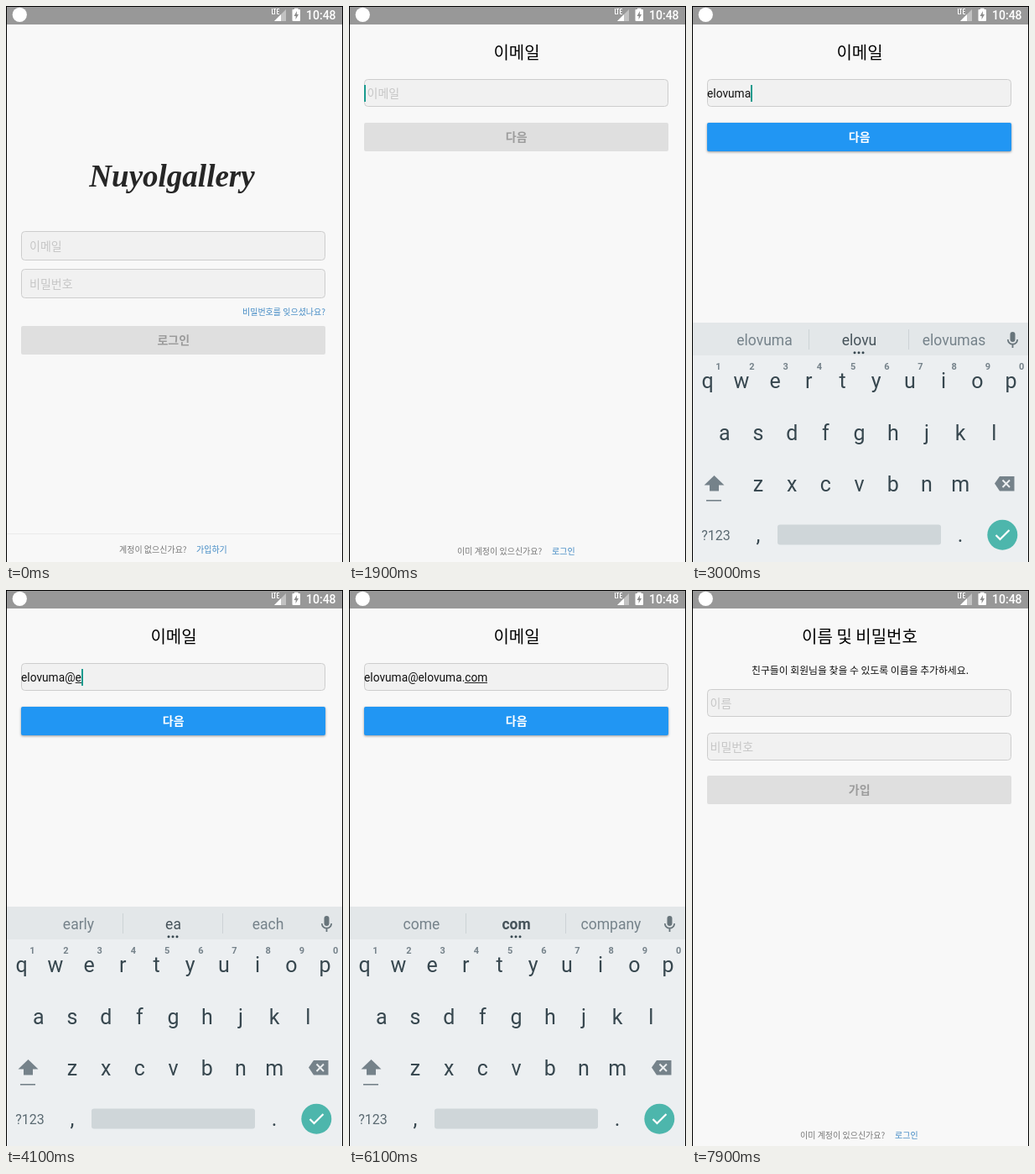
An HTML page with a canvas that plays this animation: 402 by 662 pixels, repeating every 8000 ms.

```html
<!DOCTYPE html>
<html lang="ko">
<head>
<meta charset="utf-8">
<title>Sign up</title>
<style>
  html, body { margin: 0; width: 100%; height: 100%; overflow: hidden; background: #f8f8f8; }
  canvas { display: block; }
</style>
</head>
<body>
<canvas id="stage" width="402" height="662"></canvas>
<script>
const LOOP = 8000, STEP = 100;
const KOREAN = '"Noto Sans CJK KR", "Noto Sans CJK", sans-serif';
const ROBOTO = 'Roboto, sans-serif';
const PAPER = '#f8f8f8', BLUE = '#2196f3', LINK = '#4189c4', TEAL = '#4db6ac', SLATE = '#37474f', STEEL = '#75828a';
const c = document.getElementById('stage').getContext('2d');

const WORD = 'elovuma', EMAIL = WORD + '@' + WORD + '.com';
const keyTimes = [2400, 2500, 2600, 2700, 2800, 2900, 3000, 3200, 3600,
  4200, 4300, 4400, 4600, 4700, 4800, 5100, 5200, 5300, 5500];
const guess = n => [WORD, WORD.slice(0, n), WORD + 's'];
const suggestions = [
  [0, []], [2600, ['early', 'el', 'each']], [2700, guess(3)], [2800, guess(4)], [3000, guess(5)],
  [3300, []], [3900, ['early', 'ea', 'each']], [4300, guess(3)], [4400, guess(4)],
  [4700, guess(5)], [4800, guess(6)], [4900, guess(7)], [5200, []],
  [5300, ['come', 'co', 'company']], [5600, ['come', 'com', 'company']]
];

const clamp = v => Math.max(0, Math.min(1, v));

function rect(x, y, w, h, fill, radius = 0) {
  c.fillStyle = fill;
  c.beginPath();
  c.roundRect(x, y, w, h, radius);
  c.fill();
}

function disc(x, y, r, fill) {
  c.fillStyle = fill;
  c.beginPath();
  c.arc(x, y, r, 0, 7);
  c.fill();
}

function poly(fill, ...p) {
  c.fillStyle = fill;
  c.beginPath();
  for (let i = 0; i < p.length; i += 2) c.lineTo(p[i], p[i + 1]);
  c.fill();
}

function line(stroke, width, ...p) {
  c.strokeStyle = stroke;
  c.lineWidth = width;
  c.beginPath();
  for (let i = 0; i < p.length; i += 2) c.lineTo(p[i], p[i + 1]);
  c.stroke();
}

function text(str, x, y, size, fill, { align = 'left', weight = 400, family = KOREAN } = {}) {
  c.font = `${weight} ${size}px ${family}`;
  c.textAlign = align;
  c.fillStyle = fill;
  c.fillText(str, x, y);
}

const centered = (str, x, y, size, fill, weight, family) =>
  text(str, x, y, size, fill, { align: 'center', weight, family });

function field(y, h, hint, hintX = 21.5) {
  rect(18.5, y + .5, 362, h, '#f1f1f1', 4);
  c.strokeStyle = '#cdcdcd';
  c.lineWidth = 1;
  c.stroke();
  text(hint, hintX, y + h / 2 + 5.5, 14, '#c6c6c6');
}

function button(y, label, active) {
  c.save();
  if (active) {
    c.shadowColor = 'rgba(0,0,0,.4)';
    c.shadowBlur = 3;
    c.shadowOffsetY = 1;
  }
  rect(18, y, 363, 34, active ? BLUE : '#dfdfdf', 2);
  c.restore();
  centered(label, 199.7, y + 22, 14, active ? '#fff' : '#9c9c9c', 700);
}

function footer(question, x, link, linkX, y) {
  text(question, x, y, 10, '#777');
  text(link, linkX, y, 10, LINK);
}

function loginScreen() {
  centered('Nuyolgallery', 198, 215, 37, '#262626', 'italic 700', '"Liberation Serif", serif');
  field(268, 34, '이메일', 28);
  field(313, 34, '비밀번호', 28);
  text('비밀번호를 잊으셨나요?', 381, 368, 10, LINK, { align: 'right' });
  button(381, '로그인');
  rect(1, 628, 400, 1, '#ebebeb');
  footer('계정이 없으신가요?', 135, '가입하기', 227, 650.5);
}

function emailScreen(t) {
  const typed = EMAIL.slice(0, keyTimes.filter(k => k <= t).length);
  centered('이메일', 200, 63, 20, '#000');
  field(87, 32, typed ? '' : '이메일');
  button(139, '다음', typed);
  footer('이미 계정이 있으신가요?', 129, '로그인', 242, 652.5);

  text(typed, 18, 109, 13.75, '#111', { family: ROBOTO });
  const end = Math.round(18 + c.measureText(typed).width);
  const composing = typed.split(/[@.]/).pop();
  if (typed !== WORD) {
    const w = c.measureText(composing).width;
    rect(end - w, 110, w, 1, '#222');
  }
  const blinkedOff = t >= 6100 && t < 6500 || t >= 7000 && t < 7500;
  if (t >= 1900 && !blinkedOff) rect(end, 94, 2, 20, '#1a9b8e');
}

function nameScreen() {
  centered('이름 및 비밀번호', 200, 63, 20, '#000');
  centered('친구들이 회원님을 찾을 수 있도록 이름을 추가하세요.', 200.5, 100, 11.85, '#111');
  field(118, 32, '이름');
  field(170, 32, '비밀번호');
  button(221, '가입');
  footer('이미 계정이 있으신가요?', 129, '로그인', 242, 652.5);
}

function suggestionBar(t) {
  rect(1, 377, 400, 39, '#e3e7e9');
  rect(139, 385, 1, 24, '#cdd3d6');
  rect(258, 385, 1, 24, '#cdd3d6');
  const words = suggestions.filter(s => s[0] <= t).pop()[1];
  words.forEach((word, i) => centered(word, 86.5 + 113 * i, 404, 17.5,
    i === 1 ? '#46535a' : STEEL, word === 'com' ? 700 : 400, ROBOTO));
  if (words.length) for (const x of [194, 199, 204]) disc(x, 412.7, 1.5, SLATE);

  rect(379.5, 388, 6, 12, '#68757b', 3);
  c.strokeStyle = '#68757b';
  c.lineWidth = 1.7;
  c.beginPath();
  c.arc(382.5, 397, 5.7, 0, Math.PI);
  c.stroke();
  rect(381.6, 403, 1.8, 4, '#68757b');
}

function keyRow(keys, x, y) {
  [...keys].forEach((key, i) => centered(key, x + 40.2 * i, y, 25, SLATE, 400, ROBOTO));
}

function keyboard(t) {
  const upper = t < 2300;
  const cased = keys => upper ? keys : keys.toLowerCase();
  rect(1, 416, 400, 246, '#eceff1');
  suggestionBar(t);
  keyRow(cased('QWERTYUIOP'), 18.7, 455);
  keyRow(cased('ASDFGHJKL'), 38.8, 516.5);
  keyRow(cased('ZXCVBNM'), 79, 578);
  [...'1234567890'].forEach((n, i) => centered(n, 31.3 + 40.2 * i, 433, 11, STEEL, 700, ROBOTO));

  poly(upper ? TEAL : STEEL, 26.5, 559, 38.5, 570.5, 32, 570.5, 32, 577.5, 21, 577.5, 21, 570.5, 14.5, 570.5);
  rect(17, 588, 18, 1.6, STEEL);
  poly(STEEL, 361, 568.5, 367, 560, 384.5, 560, 384.5, 577.5, 367, 577.5);
  line('#eceff1', 2, 370.5, 564.5, 379, 573);
  line('#eceff1', 2, 379, 564.5, 370.5, 573);

  centered('?123', 28.5, 635.5, 16, '#5b6a72', 400, ROBOTO);
  centered(',', 79, 638, 25, SLATE, 400, ROBOTO);
  rect(102, 617.5, 195, 24, '#cfd6d9', 3);
  centered('.', 320, 638, 25, SLATE, 400, ROBOTO);
  disc(370.3, 629.7, 18, TEAL);
  line('#fff', 2.2, 362.5, 630, 367.5, 635, 378.5, 624);
}

function statusBar() {
  rect(0, 0, 402, 22, '#989898');
  disc(16.3, 10.3, 8.6, '#fff');
  line('#fff', 1, 317.5, 3, 317.5, 9.5, 319.5, 9.5);
  line('#fff', 1, 319, 3.5, 322, 3.5);
  line('#fff', 1, 320.5, 3.5, 320.5, 10);
  line('#fff', 1, 326, 3.5, 323.5, 3.5, 323.5, 9.5, 326, 9.5);
  line('#fff', 1, 323.5, 6.5, 325.5, 6.5);
  poly('#c2c2c2', 334, 4, 334, 18, 320, 18);
  poly('#fff', 328, 10, 328, 18, 320, 18);
  rect(341.5, 4, 9.5, 14, '#fff', 1);
  rect(344, 2.7, 4.5, 2, '#fff');
  poly('#8c8c8c', 347, 6, 343.5, 12, 345.7, 12, 345.5, 16, 349, 10, 346.8, 10);
  text('10:48', 358, 15.5, 14, '#fff', { weight: 500, family: ROBOTO });
}

// Fades a screen in while it settles upwards.
function enter(screen, progress, t) {
  if (progress <= 0) return;
  c.save();
  c.globalAlpha = progress;
  rect(0, 22, 402, 640, PAPER);
  c.translate(0, 6 * (1 - progress));
  screen(t);
  c.restore();
}

function draw(t) {
  enter(loginScreen, 1, t);
  enter(emailScreen, clamp((t - 400) / 300) * (t >= 500), t);
  enter(nameScreen, clamp((t - 7600) / 300), t);

  const shown = 1 - (1 - clamp((t - 1900) / 300)) ** 2;
  const hidden = clamp((t - 7600) / 200);
  if (shown > hidden) {
    c.save();
    c.globalAlpha = shown - hidden;
    c.translate(0, 18 * (1 - shown + hidden));
    keyboard(t);
    c.restore();
  }

  statusBar();
  rect(0, 0, 402, 1, '#000');
  rect(0, 0, 1, 662, '#000');
  rect(401, 0, 1, 662, '#000');
}

function tick() {
  const t = performance.now() % LOOP;
  draw(Math.floor(t / STEP) * STEP);
  requestAnimationFrame(tick);
}
tick();
</script>
</body>
</html>
```
